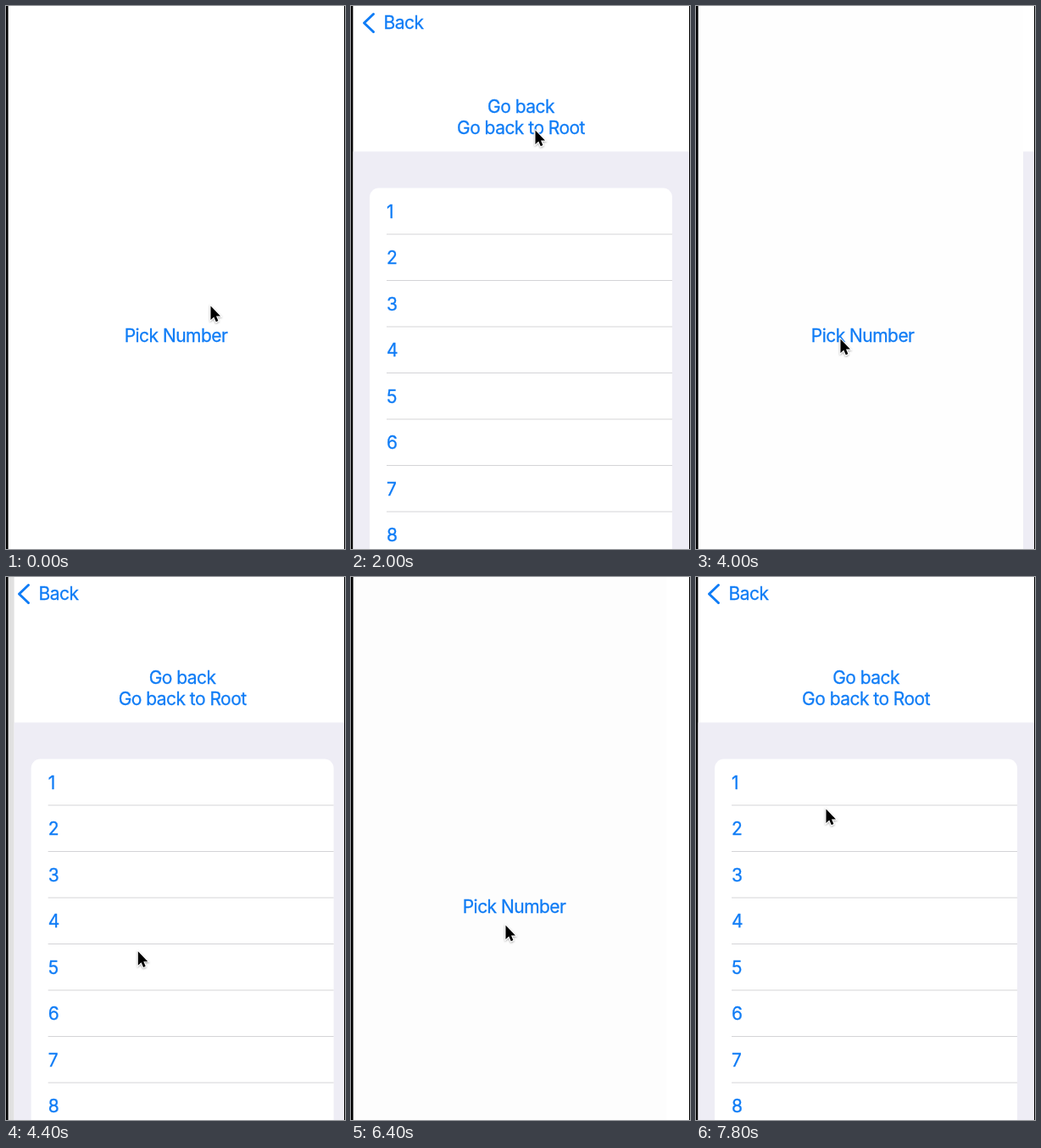
Recreate the animation shown at these times as an HTML page. Size 400x640 px, loop 8 s.

```html
<!DOCTYPE html>
<html lang="en">
<head>
<meta charset="utf-8">
<title>Pick Number</title>
<style>
  html, body { margin: 0; width: 100%; height: 100%; overflow: hidden; background: #000; }
  svg { display: block; width: 400px; height: 640px; }
  text { font: 21px Inter, Roboto, sans-serif; letter-spacing: -.53px; fill: #0f7cf6; stroke: #0f7cf6; stroke-width: .3px; }
  .mid { text-anchor: middle; }
  .value { fill: #111; stroke: none; }
  .paper { fill: #fff; }
  .group { fill: #eeedf5; }
  .line { stroke: #d4d4d7; }
</style>
</head>
<body>
<svg viewBox="0 0 400 640">
  <defs>
    <clipPath id="screen"><rect x="2.6" width="396.4" height="640"/></clipPath>
    <filter id="soft" x="-50%" y="-50%" width="200%" height="200%">
      <feDropShadow dx="0" dy="1" stdDeviation="1" flood-opacity=".4"/>
    </filter>
  </defs>
  <g clip-path="url(#screen)">
    <g id="root"></g>
    <g id="list"></g>
    <g id="detail"></g>
    <g id="back">
      <path d="M26.5 9.5 15.5 20 26.5 30.5" fill="none" stroke="#0f7cf6" stroke-width="3" stroke-linecap="round" stroke-linejoin="round"/>
      <text x="38.5" y="27">Back</text>
    </g>
  </g>
  <path id="cursor" d="M.5.5V17L4.3 13.5 6.8 19.2 9.4 18 7 12.5H12Z" stroke="#fff" stroke-width="1.8" paint-order="stroke" filter="url(#soft)"/>
</svg>
<script>
const LOOP = 8000, STEP = 200, LEFT = 2, WIDTH = 397, HEIGHT = 640;
const MARGIN = 20, ROW = 54.5, CARD_TOP = 214.5, LINE = 25.4;
const STIFFNESS = 14 / 1000, PARALLAX = .3, DIM = .12;

const $ = id => document.getElementById(id);
const rect = (cls, x, y, w, h, r = 0) => `<rect class="${cls}" x="${x}" y="${y}" width="${w}" height="${h}" rx="${r}"/>`;
const label = (text, y, cls = '') => `<text class="mid ${cls}" x="${LEFT + WIDTH / 2}" y="${y}">${text}</text>`;
const links = y => label('Go back', y) + label('Go back to Root', y + LINE);

function numberRow(_, i) {
  const x = LEFT + 2 * MARGIN, y = CARD_TOP + ROW * i;
  return `<text x="${x}" y="${y + 35}">${i + 1}</text>` +
    `<path class="line" d="M${x} ${y + ROW}H${LEFT + WIDTH - MARGIN}"/>`;
}

const content = {
  root: label('Pick Number', 396),
  list: links(125.5) +
    rect('group', LEFT, CARD_TOP - 43, WIDTH, HEIGHT) +
    rect('paper', LEFT + MARGIN, CARD_TOP, WIDTH - 2 * MARGIN, HEIGHT, 11) +
    Array.from({ length: 8 }, numberRow).join(''),
  detail: label('5', 396 - LINE, 'value') + links(396)
};
const pages = Object.keys(content);
for (const id of pages) {
  $(id).innerHTML = rect('paper', LEFT, 0, WIDTH, HEIGHT) + content[id] + rect('dim', LEFT, 0, WIDTH, HEIGHT);
}

// Each tap moves the top page in (push) or out (pop)
const push = (at, x, y, under, top) => ({ at, x, y, under, top, entering: true });
const pop = (at, x, y, under, top) => ({ at, x, y, under, top, entering: false });
const taps = [
  push(500, 219, 376, 'root', 'list'),
  pop(2832, 217, 146, 'root', 'list'),
  push(3980, 170, 392, 'root', 'list'),
  push(4735, 154, 445, 'list', 'detail'),
  pop(6086, 182, 410, 'root', 'detail'),
  push(6990, 174, 388, 'root', 'list')
];
const idle = { ...pop(0, 241, 353, 'root', 'list'), settled: true };
const stops = [idle, ...taps, { at: LOOP, x: 153, y: 273 }];

const clamp = v => Math.max(0, Math.min(1, v));
const smooth = v => v * v * (3 - 2 * v);
const mix = (a, b, k) => a + (b - a) * k;

// The pointer rests after a tap, then glides to the next one
function moveCursor(from, to, t) {
  const k = smooth(clamp(((t - from.at) / (to.at - from.at) - .35) / .25));
  $('cursor').setAttribute('transform', `translate(${mix(from.x, to.x, k)} ${mix(from.y, to.y, k)})`);
}

function place(id, x, dim) {
  const page = $(id);
  page.style.display = '';
  page.setAttribute('transform', `translate(${x.toFixed(2)})`);
  page.lastChild.setAttribute('opacity', dim);
}

function draw(t) {
  const i = stops.findLastIndex(stop => stop.at <= t);
  const { at, under, top, entering, settled } = stops[i];
  // Critically damped spring
  const s = (t - at) * STIFFNESS;
  const rest = settled ? 0 : (1 + s) * Math.exp(-s);
  const cover = entering ? 1 - rest : rest;

  for (const id of pages) $(id).style.display = 'none';
  place(under, -PARALLAX * WIDTH * cover, DIM * cover);
  place(top, WIDTH * (1 - cover), 0);
  $('back').setAttribute('opacity', under === 'root' ? clamp((cover - .4) / .4) : 1);
  moveCursor(stops[i], stops[i + 1], t);
}

const begin = performance.now();
function tick() {
  const t = (performance.now() - begin) % LOOP;
  draw(Math.floor(t / STEP) * STEP);
  requestAnimationFrame(tick);
}
tick();
</script>
</body>
</html>
```
